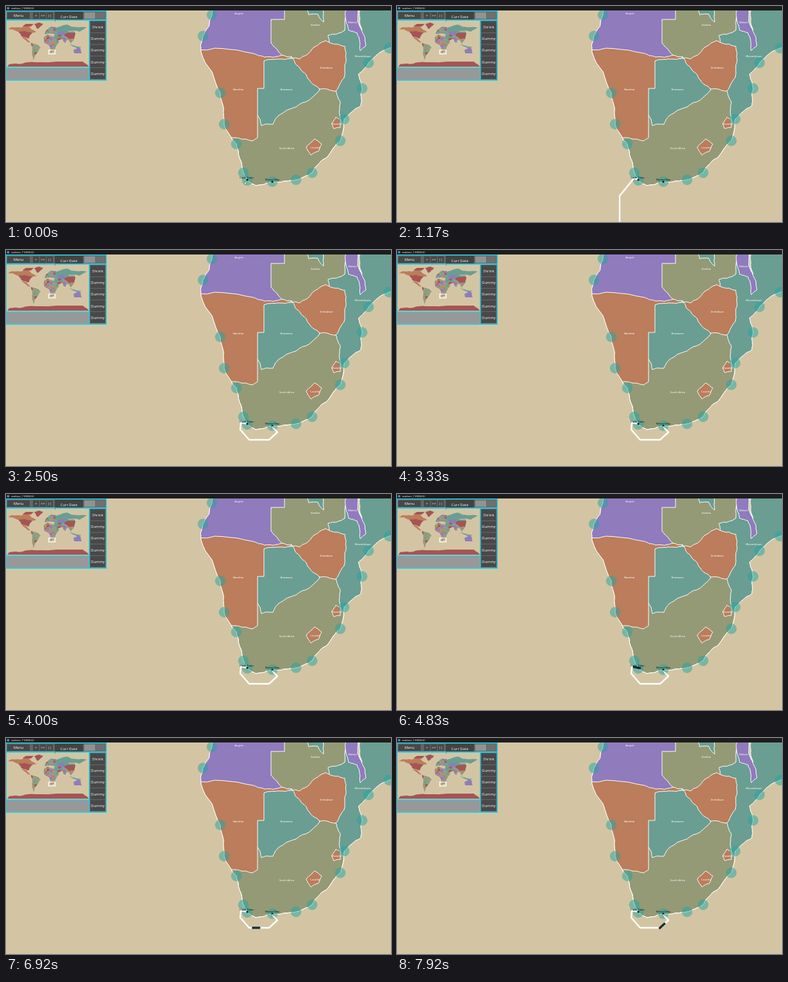
An HTML page that plays this animation: 600x338 px, repeating every 8000 ms.

```html
<!DOCTYPE html>
<html lang="en">
<head>
<meta charset="utf-8">
<title>Sea routes</title>
<style>
html, body { margin: 0; width: 100%; height: 100%; overflow: hidden; background: #d3c5a3; }
svg { display: block; width: 100vw; height: 100vh; }
text { font-family: "Noto Sans", "Open Sans", sans-serif; text-anchor: middle; }
#map path { stroke: #fff; stroke-linejoin: round; }
#ports { fill: #22a69f; fill-opacity: .5; }
#names { fill: #fff; font-size: 4.1px; }
#towns { fill: #111; font-size: 4.3px; }
#buttons { fill: #eee; font-size: 5.8px; }
.route { fill: none; stroke: #fff; stroke-width: 2.4; stroke-linejoin: round; }
</style>
</head>
<body>
<svg viewBox="0 0 600 338" preserveAspectRatio="none">
  <defs id="clips"></defs>
  <rect width="600" height="338" fill="#d3c5a3"/>
  <g id="map"></g>
  <g id="ports"></g>
  <g id="names"></g>
  <path id="southRoute" class="route" d="M376 271L369 270L347 297V338"/>
  <path id="bayRoute" class="route" d="M376 272L366 270L365 281L379 297H410L423 285L416 278"/>
  <rect id="ship" x="-6.5" y="-1.7" width="13" height="3.4" rx="1" fill="#14303a"/>
  <g id="towns">
    <circle cx="376" cy="272" r="1.6"/>
    <circle cx="415" cy="275" r="1.6"/>
    <text x="375" y="269.5">Cape Town</text>
    <text x="415" y="272.5">Mossel Bay</text>
  </g>
  <path id="cursor" d="M0 0V4.5L1.2 3.5L3.3 3.3Z" fill="#fff" stroke="#222" stroke-width=".3"/>
  <rect width="600" height="7" fill="#1d1d1d"/>
  <circle cx="3.3" cy="3.4" r="2" fill="#478cbf"/>
  <text x="8" y="4.9" font-size="3.9" fill="#eee" style="text-anchor:start">seafarer_7 (DEBUG)</text>
  <rect y="7" width="157" height="110" fill="#25cfe6"/>
  <rect x="1" y="8.5" width="154.500" height="12.700" fill="#666"/>
  <rect x="1" y="23" width="128" height="73" fill="#d3c5a3"/>
  <g id="world"></g>
  <rect x="66.5" y="69" width="10" height="6" fill="none" stroke="#fff" stroke-width="1.3"/>
  <rect x="1" y="97.7" width="128" height="17.600" fill="#989898"/>
  <rect x="130.5" y="23" width="25" height="92.300" fill="#666"/>
  <g id="buttons"></g>
</svg>
<script>
const $ = id => document.getElementById(id);
const colors = { purple: '#907bbd', olive: '#949a76', orange: '#bb7d5b', teal: '#6a9e92', red: '#a65455', sand: '#d3c5a3' };

let seed = 7;
const random = () => (seed = seed * 16807 % 2147483647) / 2147483647;
const jitter = size => (random() - .5) * size;

function add(parent, tag, attrs, text = '') {
  const el = document.createElementNS('http://www.w3.org/2000/svg', tag);
  for (const key in attrs) el.setAttribute(key, attrs[key]);
  el.textContent = text;
  parent.append(el);
  return el;
}
const label = (parent, text, x, y) => add(parent, 'text', { x, y }, text);
const parse = text => text.split(' ').map(pair => pair.split(',').map(Number));

// Midpoint displacement; horizontal and vertical borders stay straight.
function roughen(points, depth = 3) {
  if (!depth) return points;
  const finer = points.flatMap(([x, y], i) => {
    const [nextX, nextY] = points[(i + 1) % points.length];
    const dx = nextX - x, dy = nextY - y;
    const shift = dx && dy ? jitter(.16) : 0;
    return [[x, y], [x + dx / 2 - dy * shift, y + dy / 2 + dx * shift]];
  });
  return roughen(finer, depth - 1);
}
const outline = points => 'M' + roughen(points).map(p => p.map(v => v.toFixed(1))).join('L') + 'Z';

function clippedGroup(parent, d, id) {
  add(add($('clips'), 'clipPath', { id }), 'path', { d });
  return add(parent, 'g', { 'clip-path': `url(#${id})` });
}

// The coast runs from port to port, with a few capes between them.
const coast = [
  [321, 14], [307, 47], [304, 72, 'cape'], [334, 136], [340, 185], [359, 216], [370, 261],
  [376, 273], [389, 281, 'cape'], [415, 275], [452, 272], [477, 261], [521, 211], [527, 177],
  [553, 156, 'cape'], [555, 129], [549, 107, 'cape'], [565, 89], [597, 66],
];
const shore = outline([...coast.map(([x, y]) => [x, y]), [620, 60], [620, -9], [324, -9]]);
add($('map'), 'path', { d: shore, fill: colors.olive });
const countries = clippedGroup($('map'), shore, 'land');
Object.entries({
  Botswana: ['teal', '400,85 430,82 447,82 470,90 489,131 452,158 424,172 416,185 398,187 391,168 391,129'],
  Namibia: ['orange', '290,60 410,60 430,77 446,80 430,83 402,86 402,129 392,129 392,206 384,211 367,208 358,206 290,206'],
  Angola: ['purple', '290,-9 434,-9 434,21 413,21 413,58 430,77 403,80 384,74 290,72'],
  Mozambique: ['teal', '620,-9 530,-9 528,38 502,46 504,58 514,133 521,150 520,170 524,184 540,190 620,150'],
  Zimbabwe: ['orange', '446,81 457,83 468,77 481,64 498,54 506,58 528,63 530,85 527,112 514,133 489,130 473,116 459,99'],
  Congo: ['teal', '467,-9 472,14 486,13 495,25 497,-9'],
  Eswatini: ['orange', '508,183 514,174 521,178 521,190 511,192'],
  Lesotho: ['orange', '468,221 481,208 492,216 487,227 475,233'],
  Malawi: ['purple', '532,-9 530,24 534,38 547,42 552,70 561,62 558,46 552,30 547,-9'],
  lake: ['sand', '547,-9 553,-9 551,24 555,38 548,24'],
}).forEach(([, [color, points]]) =>
  add(countries, 'path', { d: outline(parse(points)), fill: colors[color] }));
add($('map'), 'path', { d: shore, fill: 'none' });

coast.filter(point => !point[2]).forEach(([cx, cy]) => add($('ports'), 'circle', { cx, cy, r: 8.3 }));

[
  ['Angola', 363, 13], ['Zambia', 482, 31], ['Malawi', 540, 27], ['Mozambique', 556, 80],
  ['Zimbabwe', 499, 97.5], ['Botswana', 437, 132], ['Namibia', 362, 132],
  ['South Africa', 437.5, 224], ['Lesotho', 482, 223], ['eSwatini', 515, 186],
].forEach(name => label($('names'), ...name));

// Overview: rough continents, the larger ones scattered with random countries.
function continent(points, base, cells = 0, palette = []) {
  const corners = parse(points);
  const d = outline(corners);
  add($('world'), 'path', { d, fill: colors[base] });
  const group = clippedGroup($('world'), d, 'continent' + points.length + base);
  for (let i = 0; i < cells; i++) {
    const a = corners[Math.floor(random() * corners.length)];
    const b = corners[Math.floor(random() * corners.length)];
    const mix = random();
    const cell = [0, 1, 2, 3, 4].map(k => {
      const angle = k * Math.PI * .4, radius = 2 + random() * 2;
      return [a[0] + (b[0] - a[0]) * mix + radius * Math.cos(angle), a[1] + (b[1] - a[1]) * mix + radius * Math.sin(angle)];
    });
    add(group, 'path', { d: outline(cell), fill: colors[palette[i % palette.length]], stroke: '#d3c5a3', 'stroke-width': .2 });
  }
}
const mixed = ['teal', 'orange', 'red', 'purple', 'olive'];
continent('3,36 9,33 35,31 47,41 36,43 19,40', 'orange');
continent('26,32 31,28 43,28 39,32', 'red');
continent('44,28 52,26 58,28 49,36', 'red');
continent('19,40 41,42 35,51 25,48', 'red');
continent('24,48 31,50 39,58 33,56', 'orange');
continent('39,58 47,60 54,65 47,75 43,84 41,70', 'olive', 9, ['teal', 'olive', 'red']);
continent('59,49 65,45 78,48 83,56 76,69 70,74 67,61 60,57', 'olive', 40, mixed);
continent('60,44 63,38 71,32 78,34 82,44 70,43', 'teal', 14, mixed);
continent('75,46 80,41 107,40 107,50 101,59 96,52 92,58 88,51 80,54', 'teal', 18, mixed);
continent('76,34 95,29 126,34 115,40 92,41 78,41', 'teal');
continent('80,41 92,40 93,45 82,45', 'purple');
continent('90,45 97,42 108,42 106,51 98,52', 'red');
continent('99,60 106,62 118,64 110,66', 'teal');
continent('105,69 111,66 116,66 118,74 106,74', 'purple');
continent('2,95 5,91 45,88 78,87 120,87 129,95', 'red');

function button(text, x, width, y = 10, height = 10, fill = '#484848') {
  add($('buttons'), 'rect', { x, y, width, height, fill });
  label($('buttons'), text, x + width / 2, y + height / 2 + 2.1);
}
button('Menu', 2, 35);
['>', '>>', '||'].forEach((text, i) => button(text, 42 + i * 10.8, 9.5));
button('Curr Date', 76, 44, 9, 15, '#434343');
add($('buttons'), 'rect', { x: 1, y: 21.2, width: 154, height: 1.8, fill: '#25cfe6' });
add($('buttons'), 'rect', { x: 77, y: 23, width: 43, height: 1.5, fill: colors.sand });
button('', 122, 17, 10, 10, '#929292');
button('', 140, 14, 10, 10, '#707070');
['Shrink', ...Array(4).fill('Dummy')].forEach((text, i) =>
  button(text, 131.5, 23, 24.3 + i * 18.2, 17));

const show = (id, visible) => $(id).style.display = visible ? '' : 'none';

function draw() {
  const t = performance.now() % 8000;
  const targeted = t >= 2000;
  show('southRoute', t >= 920 && !targeted);
  show('bayRoute', targeted);
  show('cursor', t < 920 || targeted);
  $('cursor').setAttribute('transform', targeted ? 'translate(414.5 275)' : 'translate(372 275)');

  show('ship', t >= 4745);
  const distance = Math.max(0, t - 4745) * .0245;
  const at = $('bayRoute').getPointAtLength(distance);
  const ahead = $('bayRoute').getPointAtLength(distance + .1);
  const angle = Math.atan2(ahead.y - at.y, ahead.x - at.x) * 180 / Math.PI;
  $('ship').setAttribute('transform', `translate(${at.x} ${at.y}) rotate(${angle})`);
  requestAnimationFrame(draw);
}
draw();
</script>
</body>
</html>
```
